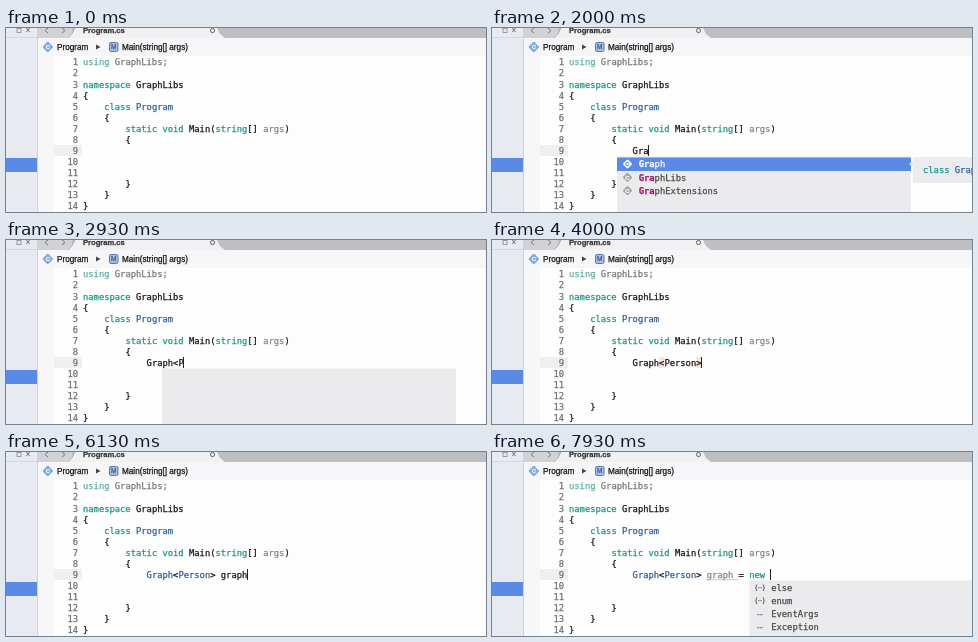
Animation, 480 px wide and 184 px high, one loop 8000 ms. Source, as an HTML page with a canvas:

```html
<!DOCTYPE html>
<html lang="en">
<head>
<meta charset="utf-8">
<title>Code completion</title>
<style>
html, body { margin: 0; width: 100%; height: 100%; overflow: hidden; }
canvas { display: block; width: 480px; height: 184px; }
</style>
</head>
<body>
<canvas></canvas>
<script>
const LOOP = 8000, CHAR = 5.3, LEFT = 77;
const MONO = '8.8px "DejaVu Sans Mono", monospace';
const SANS = '8.2px "Liberation Sans", sans-serif';
const INK = '#161616', KEY = '#1a948a', TYPE = '#2f5f94', FADED = '#858585', MATCH = '#a3186b', BLUE = '#5a8ae6';

const canvas = document.querySelector('canvas');
const ctx = canvas.getContext('2d');
const scale = window.devicePixelRatio || 1;
canvas.width = 480 * scale;
canvas.height = 184 * scale;
ctx.scale(scale, scale);

// Each line: indent, then text and colour in turn
const code = {
  1: [0, 'using', '#62aca5', ' GraphLibs;', '#777'],
  3: [0, 'namespace', KEY, ' GraphLibs', INK],
  4: [0, '{', INK],
  5: [4, 'class', KEY, ' Program', TYPE],
  6: [4, '{', INK],
  7: [8, 'static void', KEY, ' Main(', INK, 'string', KEY, '[] ', INK, 'args', FADED, ')', INK],
  8: [8, '{', INK],
  12: [8, '}', INK],
  13: [4, '}', INK],
  14: [0, '}', INK]
};

const typed = [
  [0, ''], [1270, 'G'], [1530, 'Gr'], [1730, 'Gra'], [2600, 'Graph'], [2730, 'Graph<'],
  [2870, 'Graph<P'], [3070, 'Graph<Pe'], [3200, 'Graph<Per'], [3330, 'Graph<Pers'],
  [3530, 'Graph<Person>'], [4870, 'Graph<Person> '], [5000, 'Graph<Person> g'],
  [5130, 'Graph<Person> gr'], [5270, 'Graph<Person> gra'], [5400, 'Graph<Person> grap'],
  [5530, 'Graph<Person> graph'], [6200, 'Graph<Person> graph '], [6330, 'Graph<Person> graph ='],
  [6470, 'Graph<Person> graph = '], [6870, 'Graph<Person> graph = n'],
  [6930, 'Graph<Person> graph = ne'], [7000, 'Graph<Person> graph = new'],
  [7400, 'Graph<Person> graph = new ']
];

const cursorOff = [[0, 660], [4270, 4670], [5870, 6080]];

const construct = 'new GraphLibs.Graph<global::Person>()';
const popups = [
  { from: 1400, to: 2600, x: 125, selected: 0, start: 0, tip: 'Graph', tipFrom: 1870,
    rows: [['C', 'Graph'], ['N', 'GraphLibs'], ['N', 'GraphExtensions']] },
  { from: 2930, to: 3000, x: 156, rows: [] },
  { from: 3000, to: 3530, x: 156, selected: 0, start: 6, tip: 'Person', tipFrom: 3270,
    rows: [['C', 'Person'], ['C', 'PersonExtensions']] },
  { from: 6530, to: 6930, x: 236.5, selected: 0, start: 22,
    rows: [['C', construct], ['⌘', 'new'], ['N', 'GraphLibs']] },
  { from: 6930, to: 7400, x: 236.5, selected: 0, start: 22,
    rows: [['⌘', 'new'], ['C', construct]] },
  { from: 7530, to: LOOP, x: 257.5, selected: -1, start: 26,
    rows: [['(··)', 'else'], ['(··)', 'enum'], ['···', 'EventArgs'], ['···', 'Exception']] }
];

const within = (t, from, to) => t >= from && t < to;
const baseline = line => 37.4 + 11.06 * (line - 1);
const column = n => LEFT + n * CHAR;

function rect(x, y, w, h, color) {
  ctx.fillStyle = color;
  ctx.fillRect(x, y, w, h);
}

// A hairline outline gives the text a slightly heavier weight
function text(s, x, y, color, font = MONO, align = 'left') {
  ctx.font = font;
  ctx.fillStyle = ctx.strokeStyle = color;
  ctx.textAlign = align;
  ctx.lineWidth = 0.25;
  ctx.fillText(s, x, y);
  ctx.strokeText(s, x, y);
}

function runs(x, y, parts) {
  for (let i = 0; i < parts.length; i += 2) {
    text(parts[i], x, y, parts[i + 1]);
    x += parts[i].length * CHAR;
  }
}

function stroke(points, color, width = 1) {
  ctx.beginPath();
  points.forEach(([x, y]) => ctx.lineTo(x, y));
  ctx.strokeStyle = color;
  ctx.lineWidth = width;
  ctx.stroke();
}

function polygon(points, color) {
  ctx.beginPath();
  points.forEach(([x, y]) => ctx.lineTo(x, y));
  ctx.fillStyle = color;
  ctx.fill();
}

function diamond(x, y, color, letterColor, size = 7) {
  ctx.save();
  ctx.translate(x, y);
  ctx.rotate(Math.PI / 4);
  ctx.fillStyle = color;
  ctx.beginPath();
  ctx.roundRect(-size / 2, -size / 2, size, size, 1.2);
  ctx.fill();
  ctx.restore();
  text('C', x, y + 2.2, letterColor, 'bold 6px "Liberation Sans", sans-serif', 'center');
}

function drawWindow() {
  rect(0, 0, 480, 184, '#fefdfe');
  rect(0, 0, 31, 184, '#e8eaf1');
  rect(0, 9, 31, 1, '#d6d7dd');
  rect(0, 130, 31, 14, BLUE);
  rect(31, 0, 1, 184, '#cfcfd4');
  ctx.strokeStyle = '#888';
  ctx.lineWidth = 0.8;
  ctx.strokeRect(11, 0.5, 4, 4);
  text('×', 22, 4.8, '#777', SANS, 'center');

  rect(32, 0, 448, 10, '#bfbec2');
  rect(32, 10, 448, 18, '#f6f5f7');
  rect(32, 0, 34, 10, '#d2d1d5');
  polygon([[69, 0], [211, 0], [214, 6], [219, 10], [62, 10], [66, 6]], '#f1f0f2');
  stroke([[69, 0], [66, 6], [62, 10]], '#aaa', 0.8);
  stroke([[42, 0], [39, 2.5], [42, 5]], '#777');
  stroke([[56, 0], [59, 2.5], [56, 5]], '#777');
  text('Program.cs', 77, 5.2, '#333', 'bold 7.6px "Liberation Sans", sans-serif');
  ctx.beginPath();
  ctx.arc(206.5, 2.5, 2.1, 0, 7);
  ctx.strokeStyle = '#555';
  ctx.lineWidth = 0.9;
  ctx.stroke();

  diamond(41.8, 19, '#7ea9e4', '#fff', 8);
  text('Program', 51, 21.8, INK, SANS);
  polygon([[90, 16.4], [94.5, 19], [90, 21.6]], '#444');
  ctx.fillStyle = '#a9c1e2';
  ctx.strokeStyle = '#5d7ba6';
  ctx.lineWidth = 1;
  ctx.beginPath();
  ctx.roundRect(103.5, 14.5, 8.5, 9, 1.5);
  ctx.fill();
  ctx.stroke();
  text('M', 107.8, 21.2, '#3e5f90', '6.5px "Liberation Sans", sans-serif', 'center');
  text('Main(string[] args)', 116, 21.8, INK, SANS);

  rect(32, 28, 16, 156, '#f7f6f9');
  rect(48, 117, 28, 11, '#efeef0');
  for (let n = 1; n <= 14; n++) {
    text(n, 72, baseline(n), '#707070', MONO, 'right');
    if (code[n]) runs(column(code[n][0]), baseline(n), code[n].slice(1));
  }
}

function drawTypedLine(t, line) {
  const x = column(12), y = baseline(9);
  if (within(t, 3530, 4870)) {
    for (const i of [5, 12]) rect(x + i * CHAR, 117, CHAR, 11, '#fae3d8');
  }
  const typeColor = t >= 4330 ? TYPE : INK;
  const nameColor = t >= 6700 ? FADED : INK;
  const parts = [[5, typeColor], [6, INK], [12, typeColor], [14, INK], [19, nameColor], [22, INK], [26, KEY]];
  let start = 0;
  runs(x, y, parts.flatMap(([end, color]) => {
    const part = [line.slice(start, end), color];
    start = end;
    return part;
  }));
  if (t >= 6700) {
    const wave = Array.from({ length: 17 }, (_, i) => [214 + 2 * i, 127.2 + i % 2]);
    stroke(wave, '#dfa294', 0.7);
  }
  if (!cursorOff.some(([from, to]) => within(t, from, to))) {
    rect(Math.floor(x + line.length * CHAR), 117, 1, 11, '#222');
  }
}

function drawIcon(kind, x, y, selected) {
  if (kind === 'C') diamond(x, y, selected ? '#fff' : '#6d9de0', selected ? BLUE : '#fff');
  else if (kind === 'N') diamond(x, y, '#a5a5a8', '#fff');
  else text(kind, x, y + 2.6, selected ? '#fff' : '#555', '7px "DejaVu Sans", sans-serif', 'center');
}

function drawPopup(t, popup, line) {
  const { x, rows, selected, start, tip } = popup;
  rect(x, 128.5, 294, 56, '#ebeaec');
  rows.forEach(([icon, label], i) => {
    const mid = 136 + 13.3 * i - (selected < 0 ? 0.7 : 0), active = i === selected;
    if (active) rect(x, 129.5, 294, 13.5, BLUE);
    drawIcon(icon, x + 10.5, mid, active);
    const prefix = line.slice(start);
    const hit = prefix && label.startsWith(prefix) ? prefix.length : 0;
    const lx = x + 21.7, ly = mid + 3.2;
    text(label.slice(0, hit), lx, ly, active ? '#fff' : MATCH, 'bold ' + MONO);
    text(label.slice(hit), lx + hit * CHAR, ly, active ? '#fff' : '#4a4a4a');
  });
  if (tip && t >= popup.tipFrom) {
    ctx.fillStyle = '#eaecf0';
    ctx.beginPath();
    ctx.roundRect(x + 296, 129, 100, 26, 3);
    ctx.fill();
    polygon([[x + 296, 133], [x + 292, 136], [x + 296, 139]], '#eaecf0');
    runs(x + 306, 145, ['class ', KEY, tip, TYPE]);
  }
}

function draw(now) {
  const t = now % LOOP;
  const line = typed.findLast(([time]) => time <= t)[1];
  const popup = popups.find(({ from, to }) => within(t, from, to));
  drawWindow();
  drawTypedLine(t, line);
  if (popup) drawPopup(t, popup, line);
}

const began = performance.now();
function tick() {
  draw(performance.now() - began);
  requestAnimationFrame(tick);
}
tick();
</script>
</body>
</html>
```
